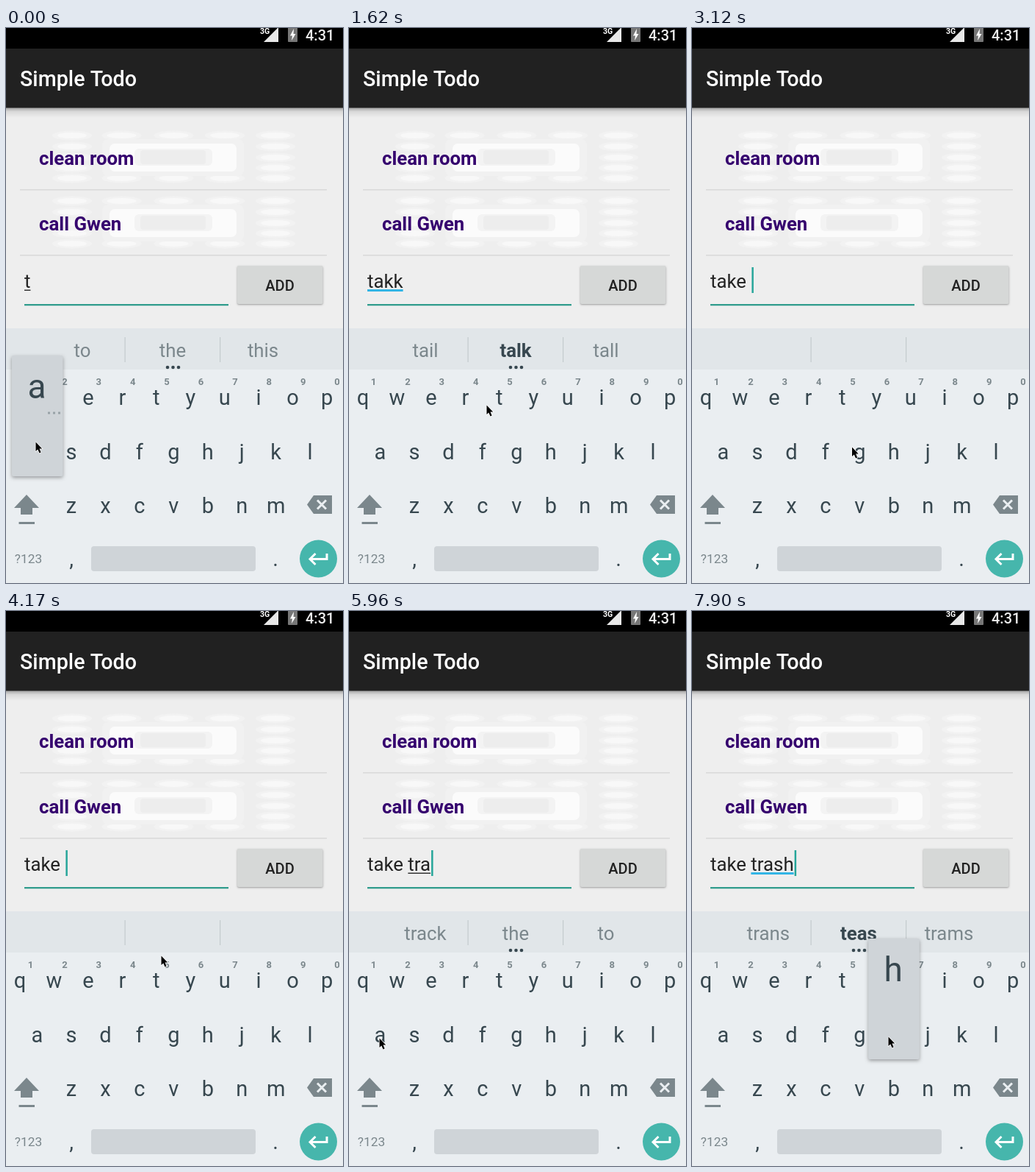
An HTML page with a canvas for the animation above (8 s loop, 459 px wide and 754 px high).

```html
<!DOCTYPE html>
<html lang="en">
<head>
<meta charset="utf-8">
<title>Simple Todo</title>
<style>
html, body { margin: 0; width: 100%; height: 100%; overflow: hidden; }
canvas { display: block; }
</style>
</head>
<body>
<canvas id="stage" width="459" height="754"></canvas>
<script>
const c = document.getElementById('stage').getContext('2d');
const LOOP = 8000, TICK = 149;
const INK = '#37474f', GREY = '#7b878c', KEY = '#cfd4d8', TEAL = '#26a69a';

// Timelines, in ticks
const typed = [[-4, 't'], [1, 'ta'], [5, 'tak'], [7, 'takk'], [14, 'takke'], [20, 'take '],
  [30, 'take t'], [34, 'take tr'], [39, 'take tra'], [43, 'take tras'], [53, 'take trash']];
// A "!" marks an automatic correction
const hints = [[0, 'to the this'], [2, 'take ta talk'], [6, 'take tak talk'], [8, 'tail !talk tall'],
  [15, 'talked !take tackle'], [20, ''], [32, 'to the this'], [35, 'track the to'],
  [41, 'trans train training'], [45, 'trans !teas trams']];
const presses = [[0, 'a'], [1, ''], [5, 'k'], [6, ''], [7, 'k'], [8, ''], [13, 'e'], [15, ''],
  [30, 't'], [31, ''], [34, 'r'], [35, ''], [39, 'a'], [40, ''], [53, 'h']];
const path = [[0, 40, 562], [1, 40, 562], [4, 368, 568], [8, 374, 572], [11, 187, 512], [13, 108, 497],
  [14, 108, 497], [17, 219, 443], [19, 219, 443], [23, 216, 695], [24, 216, 708], [25, 214, 690],
  [28, 211, 468], [29, 206, 495], [31, 206, 495], [33, 160, 495], [34, 160, 495], [36, 41, 580],
  [40, 41, 580], [41, 76, 578], [46, 76, 578], [52, 267, 578], [54, 267, 578]];

const rows = [['qwertyuiop', 19, 512], ['asdfghjkl', 42.5, 586], ['zxcvbnm', 89, 659]];
const PITCH = 46.45;

const latest = (list, n) => list.filter(e => e[0] <= n).pop();

function font(size, weight = 400) { c.font = `${weight} ${size}px Roboto, sans-serif`; }

function text(s, x, y, size, color, weight, align = 'left') {
  font(size, weight);
  c.fillStyle = color;
  c.textAlign = align;
  c.fillText(s, x, y);
}

function rect(x, y, w, h, color, r = 0) {
  c.fillStyle = color;
  c.beginPath();
  c.roundRect(x, y, w, h, r);
  c.fill();
}

function oval(x, y, rx, ry, color) {
  c.fillStyle = color;
  c.beginPath();
  c.ellipse(x, y, rx, ry, 0, 0, 7);
  c.fill();
}

function poly(points, color) {
  c.fillStyle = color;
  c.beginPath();
  for (let i = 0; i < points.length; i += 2) c.lineTo(points[i], points[i + 1]);
  c.closePath();
  c.fill();
}

function line(points, color, width) {
  c.strokeStyle = color;
  c.lineWidth = width;
  c.beginPath();
  for (let i = 0; i < points.length; i += 2) c.lineTo(points[i], points[i + 1]);
  c.stroke();
}

function raised(x, y, w, h, color, blur) {
  c.save();
  c.shadowColor = 'rgba(0,0,0,.35)';
  c.shadowBlur = blur;
  c.shadowOffsetY = blur / 2.5;
  rect(x, y, w, h, color, 2);
  c.restore();
}

function header() {
  rect(0, 108, 459, 300, '#eeeeee');
  const shade = c.createLinearGradient(0, 108, 0, 122);
  shade.addColorStop(0, 'rgba(0,0,0,.32)');
  shade.addColorStop(.4, 'rgba(0,0,0,.09)');
  shade.addColorStop(1, 'rgba(0,0,0,0)');
  rect(0, 108, 459, 14, shade);
  rect(0, 0, 459, 28, '#000');
  rect(0, 28, 459, 80.5, '#212121');
  text('Simple Todo', 19, 78.5, 28.7, '#fff', 500);
  poly([371, -1, 371, 19, 351, 19], '#e8e8e8');
  text('3G', 346, 8, 10.5, '#fff', 700);
  rect(384, -3, 13, 22, '#777', 1);
  poly([392, 1, 387, 10.5, 390, 10.5, 389, 17, 394.5, 8, 391.5, 8], '#fff');
  text('4:31', 408, 17, 20, '#eee', 500);
}

function item(label, y) {
  for (const x of [90, 157.5, 228.5, 298, 367]) {
    const side = x === 90 || x === 367;
    for (const dy of side ? [-30, -15, 0, 14, 28] : [-30, 28]) {
      oval(x, y + dy, 27, 6.5, '#f2f2f2');
      oval(x, y + dy, 20, 4, '#f8f8f8');
    }
  }
  rect(131, y - 25, 193, 50, '#f1f1f1', 8);
  rect(141, y - 19, 173, 38, '#fbfbfb', 7);
  rect(175, y - 12, 106, 23, '#f3f3f3', 6);
  rect(183, y - 10, 89, 19, '#ededed', 4);
  text(label, 45, y + 10, 25.8, '#35006e', 700);
  rect(19, y + 43, 418, 1.5, '#d9d9d9');
}

function entry(n, corrected) {
  const [since, s] = latest(typed, n);
  text(s, 25, 353, 25.8, '#222');
  const end = 25 + c.measureText(s).width;
  const start = 25 + c.measureText(s.slice(0, s.lastIndexOf(' ') + 1)).width;
  if (corrected) rect(start, 355, end - start, 3, '#33b5e5');
  else rect(start, 355.5, end - start, 1.5, '#333');
  if (Math.floor((n - since) / 4) % 2 === 0) rect(end + 1, 325, 2.5, 35, TEAL);
  rect(25, 375, 278, 2.3, '#2f9c8c');
  raised(315, 323, 116.5, 52, '#d6d8d7', 2.5);
  text('ADD', 373, 357, 20, '#222', 500, 'center');
}

function suggestions(words) {
  rect(0, 408, 459, 56, '#e1e6e9');
  rect(161.5, 420, 1.2, 34, '#c3cace');
  rect(291, 420, 1.2, 34, '#c3cace');
  if (!words) return;
  words.split(' ').forEach((w, i) => {
    const bold = w[0] === '!';
    text(w.replace('!', ''), [104, 227, 350][i], 447, 25.8, bold ? INK : GREY, bold ? 700 : 400, 'center');
  });
}

function keyboard() {
  rect(0, 464, 459, 290, '#eaeef1');
  for (const [keys, x, y] of rows)
    [...keys].forEach((k, i) => text(k, x + i * PITCH, y, 29, INK, 400, 'center'));
  [...'1234567890'].forEach((d, i) => text(d, 33.5 + i * 46.4, 485, 13, GREY, 700, 'center'));
  poly([28, 634, 45, 652, 36, 652, 36, 661, 20, 661, 20, 652, 11, 652], GREY);
  rect(17.5, 671, 21.5, 3, GREY);
  poly([410, 647.5, 419, 635, 444, 635, 444, 660, 419, 660], GREY);
  line([424, 641.5, 436, 653.5], '#eaeef1', 3);
  line([436, 641.5, 424, 653.5], '#eaeef1', 3);
  text('?123', 30.5, 727, 17.3, GREY, 400, 'center');
  text(',', 89, 731, 29, INK, 400, 'center');
  text('.', 367, 731, 29, INK, 400, 'center');
  rect(116, 704, 224, 34, KEY, 4);
  oval(425.5, 721, 25.5, 25.5, '#46b6ac');
  line([437, 714, 437, 721.5, 415, 721.5], '#fff', 3);
  line([421.5, 714, 414, 721.5, 421.5, 729], '#fff', 3);
}

function popup(key) {
  const [keys, x0, base] = rows.find(r => r[0].includes(key));
  const x = x0 + keys.indexOf(key) * PITCH, top = base - 141;
  raised(x - 34.5, top, 69.5, 164, KEY, 5);
  text(key, x - .5, top + 58, 46, INK, 400, 'center');
  if ('aert'.includes(key))
    for (let i = 0; i < 3; i++) rect(x + 14.5 + i * 7, top + 76.5, 3, 3, '#98a2a7');
}

function pointer(n) {
  const i = Math.max(1, path.findIndex(p => p[0] > n));
  const [n0, x0, y0] = path[i - 1], [n1, x1, y1] = path[i];
  const u = (n - n0) / (n1 - n0), e = u * u * (3 - 2 * u);
  c.save();
  c.translate(x0 + (x1 - x0) * e, y0 + (y1 - y0) * e);
  const arrow = [0.5, 0.5, 0.5, 13, 3.3, 10.5, 5.5, 15.5, 7.6, 14.6, 5.5, 9.6, 9.2, 9.4];
  line([...arrow, 0.5, 0.5], '#fff', 1.4);
  poly(arrow, '#000');
  c.restore();
}

function draw(now) {
  const n = Math.floor((now % LOOP + 20) / TICK);
  const words = latest(hints, n)[1], key = latest(presses, n)[1];
  header();
  item('clean room', 176);
  item('call Gwen', 265);
  entry(n, words.includes('!'));
  suggestions(words);
  keyboard();
  if (words) for (const x of [220, 227.5, 235]) oval(x, 461, 2.3, 2.3, INK);
  if (key) popup(key);
  pointer(n);
}

const begin = performance.now();
function loop() {
  draw(performance.now() - begin);
  requestAnimationFrame(loop);
}
loop();
</script>
</body>
</html>
```
